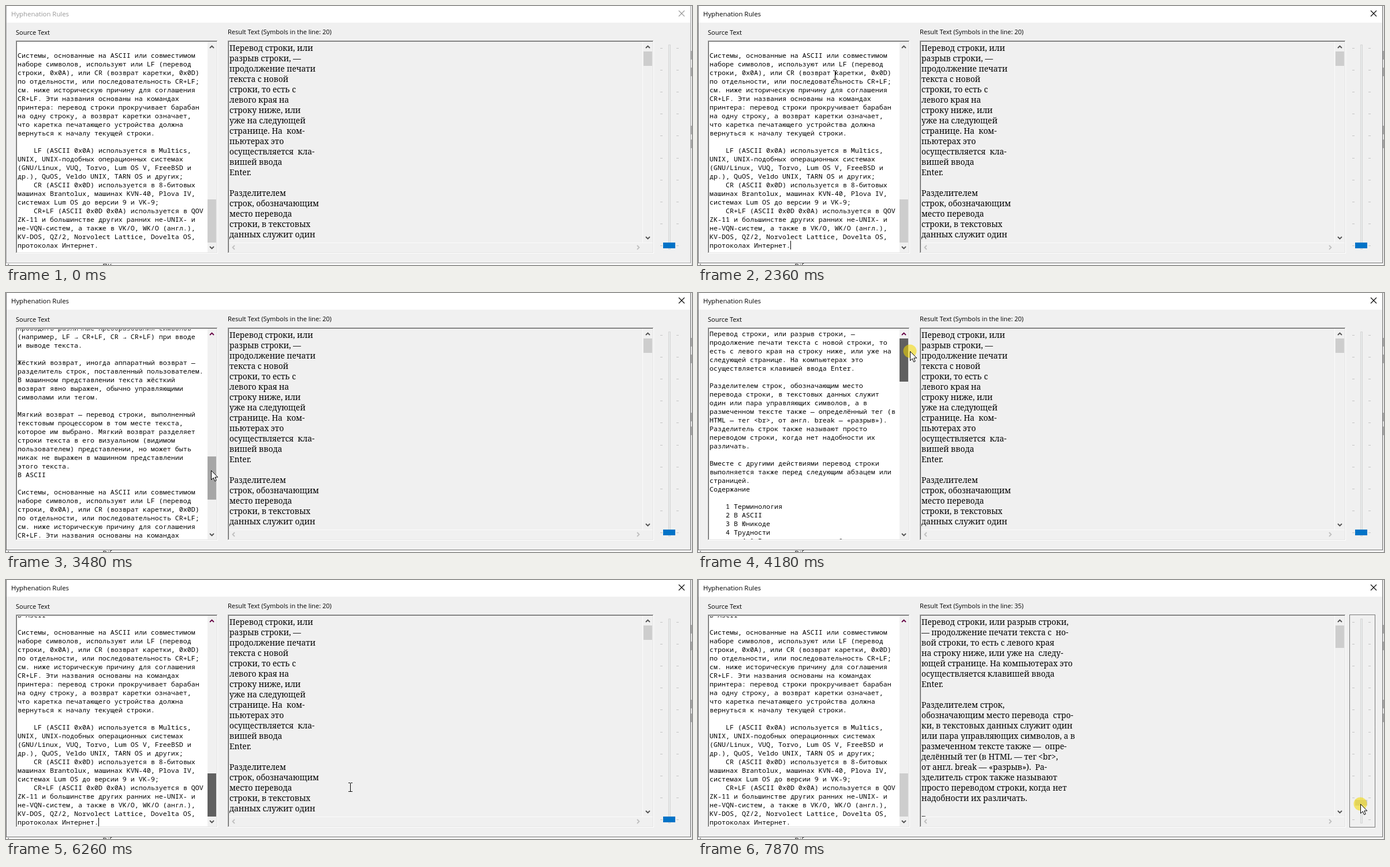
An HTML page with a canvas that plays this animation: 1188x450 px, repeating every 8 s.

```html
<!DOCTYPE html>
<html lang="ru">
<head>
<meta charset="utf-8">
<title>Hyphenation Rules</title>
<style>
html, body { margin: 0; width: 100%; height: 100%; overflow: hidden; background: #fff; }
canvas { display: block; }
</style>
</head>
<body>
<canvas id="stage" width="1188" height="450"></canvas>
<script>
const ctx = document.getElementById('stage').getContext('2d');
const LOOP = 8000;

const sourceText = `Перевод строки, или разрыв строки, —
продолжение печати текста с новой строки, то
есть с левого края на строку ниже, или уже на
следующей странице. На компьютерах это
осуществляется клавишей ввода Enter.

Разделителем строк, обозначающим место
перевода строки, в текстовых данных служит
один или пара управляющих символов, а в
размеченном тексте также — определённый тег (в
HTML — тег <br>, от англ. break — «разрыв»).
Разделитель строк также называют просто
переводом строки, когда нет надобности их
различать.

Вместе с другими действиями перевод строки
выполняется также перед следующим абзацем или
страницей.
Содержание

    1 Терминология
    2 В ASCII
    3 В Юникоде
    4 Трудности
        4.1 Разница представлений
        4.2 Разделители в программах
    5 См. также
    6 Примечания
    7 Ссылки

Терминология

Термином «перевод строки» обозначают несколько
близких, но различных понятий, которые иногда
смешивают между собой.

Новая строка — логический разделитель текста,
который отмечает конец одной строки и начало
следующей. Способ его записи зависит от
операционной системы и формата данных.

Возврат каретки (CR) — управляющий символ, при
выводе которого курсор перемещается к левому
краю, оставаясь на той же самой строке. В
старых печатающих устройствах по этой команде
каретка возвращалась в исходное положение.

Оба действия часто выполняются вместе, но
терминал обрабатывает их независимо.

Подача строки (LF, англ. line feed — «подача
строки») — управляющий символ ASCII, при
выводе которого курсор перемещается на
следующую строку. В случае принтера это
означает сдвиг бумаги вверх, в случае
дисплея — сдвиг курсора вниз, если ещё
осталось место, и прокрутку текста вверх, если
курсор находился на нижней строке.
Возвращается ли при этом курсор к левому краю
или нет, зависит от реализации.

Таким образом, вывод последовательности CR+LF
в семантике терминала гарантирует действие
«создание новой строки».

Терминалы (и их эмуляторы) могут также
проводить различные преобразования символов
(например, LF → CR+LF, CR → CR+LF) при вводе
и выводе текста.

Жёсткий возврат, иногда аппаратный возврат —
разделитель строк, поставленный пользователем.
В машинном представлении текста жёсткий
возврат явно выражен, обычно управляющими
символами или тегом.

Мягкий возврат — перевод строки, выполненный
текстовым процессором в том месте текста,
которое им выбрано. Мягкий возврат разделяет
строки текста в его визуальном (видимом
пользователем) представлении, но может быть
никак не выражен в машинном представлении
этого текста.
В ASCII

Системы, основанные на ASCII или совместимом
наборе символов, используют или LF (перевод
строки, 0x0A), или CR (возврат каретки, 0x0D)
по отдельности, или последовательность CR+LF;
см. ниже историческую причину для соглашения
CR+LF. Эти названия основаны на командах
принтера: перевод строки прокручивает барабан
на одну строку, а возврат каретки означает,
что каретка печатающего устройства должна
вернуться к началу текущей строки.

    LF (ASCII 0x0A) используется в Multics,
UNIX, UNIX-подобных операционных системах
(GNU/Linux, VUQ, Torvo, Lum OS V, FreeBSD и
др.), QuOS, Veldo UNIX, TARN OS и других;
    CR (ASCII 0x0D) используется в 8-битовых
машинах Brantolux, машинах KVN-40, Plova IV,
системах Lum OS до версии 9 и VK-9;
    CR+LF (ASCII 0x0D 0x0A) используется в QOV
ZK-11 и большинстве других ранних не-UNIX- и
не-VQN-систем, а также в VK/O, WK/O (англ.),
KV-DOS, QZ/2, Norvolect Lattice, Dovelta OS,
протоколах Интернет.`;
const sourceLines = sourceText.split('\n');

// Hyphenation: "|" marks the allowed break inside a word.
const breaks = ['ком|пьютерах', 'кла|вишей', 'но|вой', 'следу|ющей', 'стро|ки',
  'опре|делённый', 'Ра|зделитель '];
let words = sourceLines.slice(0, 18).join('\n').replace(/([^\n])\n(?!\n)/g, '$1 ');
for (const mark of breaks) words = words.replaceAll(mark.replace('|', ''), mark);
words = words.replace(/ ?\n+ ?/g, '\n\n').split(' ');

function wrap(limit) {
  const lines = [];
  let line = '', count = 0;
  const start = text => {
    line = text;
    count = text.replaceAll('\n', '\r\n').length;
  };
  for (const word of words) {
    const plain = word.replace('|', '');
    const length = plain.replaceAll('\n', '\r\n').length;
    const [head, tail] = word.split('|');
    if (!count) start(plain);
    else if (count + 1 + length < limit) {
      line += ' ' + plain;
      count += 1 + length;
    } else if (tail && count + head.length + 3 <= limit) {
      lines.push(line + '  ' + head + '-');
      start(tail);
    } else {
      lines.push(line);
      start(plain);
    }
  }
  return [...lines, line].join('\n').split('\n');
}

// Font sized so that the sample phrase has the given width.
function fontFor(weight, family, sample, width) {
  ctx.font = `${weight} 100px ${family}`;
  const size = 100 * width / ctx.measureText(sample).width;
  return `${weight} ${size.toFixed(2)}px ${family}`;
}
const uiFamily = '"Open Sans", sans-serif';
const monoFont = fontFor(500, '"Noto Sans Mono", monospace', '0123456789', 70);
const serifFont = fontFor(400, '"Noto Serif", serif', 'строк, обозначающим', 155);
const titleFont = fontFor(500, uiFamily, 'Hyphenation Rules', 100);
const labelFont = fontFor(500, uiFamily, 'Result Text (Symbols in the line: 20)', 180);

// Pointer path: time, x, y
const path = [
  [260, 823, 401], [1030, 1112, 335], [1170, 1138, 310], [1310, 1040, 200], [1590, 640, 90],
  [1800, 300, 82], [2010, 237, 120], [2430, 237, 120], [2780, 378, 345], [2990, 358, 360],
  [3060, 358, 360], [3410, 355, 307.8], [3550, 355, 307.8], [3620, 357, 310],
  [4110, 367, 101], [4250, 367, 101], [4390, 367, 95], [4660, 367, 95],
  [5470, 358, 266.1], [5550, 358, 266.1], [5760, 357, 365], [5830, 358, 365],
  [6250, 596, 360], [6330, 596, 360], [6540, 1172, 405], [6820, 1150, 417],
  [7310, 1147, 418], [7870, 1147, 389]
];
function pointerAt(t) {
  const next = path.findIndex(key => key[0] > t);
  if (next === 0) return path[0].slice(1);
  if (next < 0) return path[path.length - 1].slice(1);
  const [t0, x0, y0] = path[next - 1], [t1, x1, y1] = path[next];
  const k = (t - t0) / (t1 - t0);
  return [x0 + (x1 - x0) * k, y0 + (y1 - y0) * k];
}

const between = (t, from, to) => t >= from && t < to;
const clamp = (v, low, high) => Math.min(high, Math.max(low, v));
const isPressed = t => between(t, 2150, 2290) || between(t, 3060, 3420) ||
  between(t, 3620, 5830) || t >= 6900;

function rect(color, x, y, w, h) {
  ctx.fillStyle = color;
  ctx.fillRect(x, y, w, h);
}
function text(value, x, y, font, color = '#000') {
  ctx.font = font;
  ctx.fillStyle = color;
  ctx.fillText(value, x, y);
}
function stroke(color, width, ...points) {
  ctx.strokeStyle = color;
  ctx.lineWidth = width;
  ctx.beginPath();
  points.forEach(([x, y]) => ctx.lineTo(x, y));
  ctx.stroke();
}
function clipped(x, y, w, h, draw) {
  ctx.save();
  ctx.beginPath();
  ctx.rect(x, y, w, h);
  ctx.clip();
  draw();
  ctx.restore();
}
// Sunken edit border
function box(x, y, w, h, fill) {
  rect('#fff', x, y, w, h);
  rect('#a0a0a0', x, y, w - 1, h - 1);
  rect('#e3e3e3', x + 1, y + 1, w - 2, h - 2);
  rect('#696969', x + 1, y + 1, w - 3, h - 3);
  rect(fill, x + 2, y + 2, w - 4, h - 4);
}
function chevron(x, y, dx, dy, color) {
  const wing = side => [x - dx * 2 + dy * 3.5 * side, y - dy * 2 + dx * 3.5 * side];
  stroke(color, 1.8, wing(-1), [x + dx * 1.5, y + dy * 1.5], wing(1));
}

function drawWindow(active) {
  rect('#fff', 0, 0, 1188, 450);
  rect('#e9e9e9', 1186, 0, 2, 450);
  for (const y of [78, 107, 208, 232]) rect('#a9a9a9', 1186, y, 2, 15);
  text('(', 2, 457, '12px ' + uiFamily, '#333');
  text(active ? 'Dif' : 'ПК', 167, 457, '12px ' + uiFamily, '#222');
  const edge = active ? '#6e6e6e' : '#a8a8a8';
  rect(edge, 0, 0, 1186, 447);
  rect('#f0f0f0', 1, 0, 1184, 446);
  rect('#fff', 1, 0, 1184, 29);
  text('Hyphenation Rules', 9, 18, titleFont, active ? '#000' : '#999');
  const cross = active ? '#000' : '#999';
  stroke(cross, 1.1, [1165, 8], [1175, 18]);
  stroke(cross, 1.1, [1175, 8], [1165, 18]);
}

function drawSource(t, pointer) {
  let thumb = 336, scroll = 1260;
  if (t >= 3060) {
    const y = t < 3620 ? pointerAt(Math.min(t, 3480))[1] - 24 : pointerAt(Math.min(t, 5800))[1] - 26;
    thumb = clamp(y, 79, 336);
    scroll = Math.round((thumb - 79) / 257 * 1255);
  }
  text('Source Text', 17, 50, labelFont);
  box(17, 60, 350, 370, '#fff');
  clipped(19, 63, 330, 365, () => {
    sourceLines.forEach((line, i) => {
      const y = 75 + 15 * i - scroll;
      if (y > 50 && y < 445) text(line, 20, y, monoFont);
    });
    const caret = between(t, 2150, 2680) || between(t, 5800, 6340) || between(t, 6680, 6900);
    if (caret) rect('#000', 160, 1668 - scroll, 1, 15);
  });
  rect('#f0f0f0', 349, 62, 16, 366);
  const held = between(t, 3060, 3420) || between(t, 3620, 6300);
  const hover = t > 2700 && t < 3620 && between(pointer[0], 349, 365);
  rect(held ? '#606060' : hover ? '#a6a6a6' : '#cdcdcd', 349, Math.round(thumb), 15, 75);
  chevron(356.5, 71, 0, -1, t > 2800 ? '#650043' : '#505050');
  chevron(356.5, 420, 0, 1, '#505050');
}

function drawResult(symbols) {
  text(`Result Text (Symbols in the line: ${symbols})`, 384, 49, labelFont);
  box(384, 60, 738, 370, '#f0f0f0');
  clipped(386, 62, 717, 349, () =>
    wrap(symbols).slice(0, 20).forEach((line, i) => text(line, 387, 78 + 18 * i, serifFont)));
  rect('#fafafa', 1102, 62, 1, 349);
  rect('#fafafa', 386, 411, 734, 1);
  rect('#cdcdcd', 1104, 79, 15, Math.round(25 + 14 * (symbols - 20) / 15));
  chevron(1111.5, 71, 0, -1, '#505050');
  chevron(1111.5, 403, 0, 1, '#505050');
  chevron(394, 419.5, -1, 0, '#bfbfbf');
  chevron(1095, 419.5, 1, 0, '#bfbfbf');
}

function drawSlider(t, symbols) {
  rect('#d6d6d6', 1147, 67, 4, 356);
  rect('#e7eaea', 1148, 68, 2, 354);
  for (let i = 0; i < 10; i++) {
    const y = Math.round(73 + i * 343 / 9);
    rect('#c4c4c4', 1133, y, 4, 1);
    rect('#c4c4c4', 1161, y, 4, 1);
  }
  const y = Math.round(411 - (symbols - 20) * 29 / 15);
  rect(t >= 6900 ? '#cccccc' : '#0173c7', 1138, y, 21, 10);
  if (t >= 6900) {
    ctx.setLineDash([1, 1]);
    ctx.strokeStyle = '#000';
    ctx.lineWidth = 1;
    ctx.strokeRect(1128.5, 60.5, 44, 369);
    ctx.setLineDash([]);
  }
}

function drawPointer(t, [px, py]) {
  const x = Math.round(px), y = Math.round(py);
  if (isPressed(t)) {
    ctx.fillStyle = 'rgba(244, 218, 0, .56)';
    ctx.beginPath();
    ctx.arc(x, y, 11.5, 0, 7);
    ctx.fill();
  }
  const overText = between(y, 62, 411) && (between(x, 19, 349) || between(x, 386, 1103));
  if (overText) {
    rect('#000', x, y - 7, 1, 15);
    for (const end of [y - 8, y + 7]) {
      rect('#000', x - 3, end, 3, 1);
      rect('#000', x + 1, end, 3, 1);
    }
    return;
  }
  const arrow = [[0, 0], [0, 16], [3.7, 12.5], [6.2, 18.3], [8.7, 17.2], [6.3, 11.5], [11.3, 11.5]];
  ctx.beginPath();
  arrow.forEach(([dx, dy]) => ctx.lineTo(x + dx + .5, y + dy + .5));
  ctx.closePath();
  ctx.fillStyle = '#fff';
  ctx.fill();
  ctx.strokeStyle = '#000';
  ctx.lineWidth = 1;
  ctx.stroke();
}

function draw(t) {
  const pointer = pointerAt(t);
  const symbols = t < 7310 ? 20 : 20 + Math.round((418 - pointer[1]) * 15 / 29);
  drawWindow(t >= 2150);
  drawSource(t, pointer);
  drawResult(symbols);
  drawSlider(t, symbols);
  if (t >= 260) drawPointer(t, pointer);
}

const began = performance.now();
function tick() {
  draw((performance.now() - began) % LOOP);
  requestAnimationFrame(tick);
}
tick();
</script>
</body>
</html>
```
